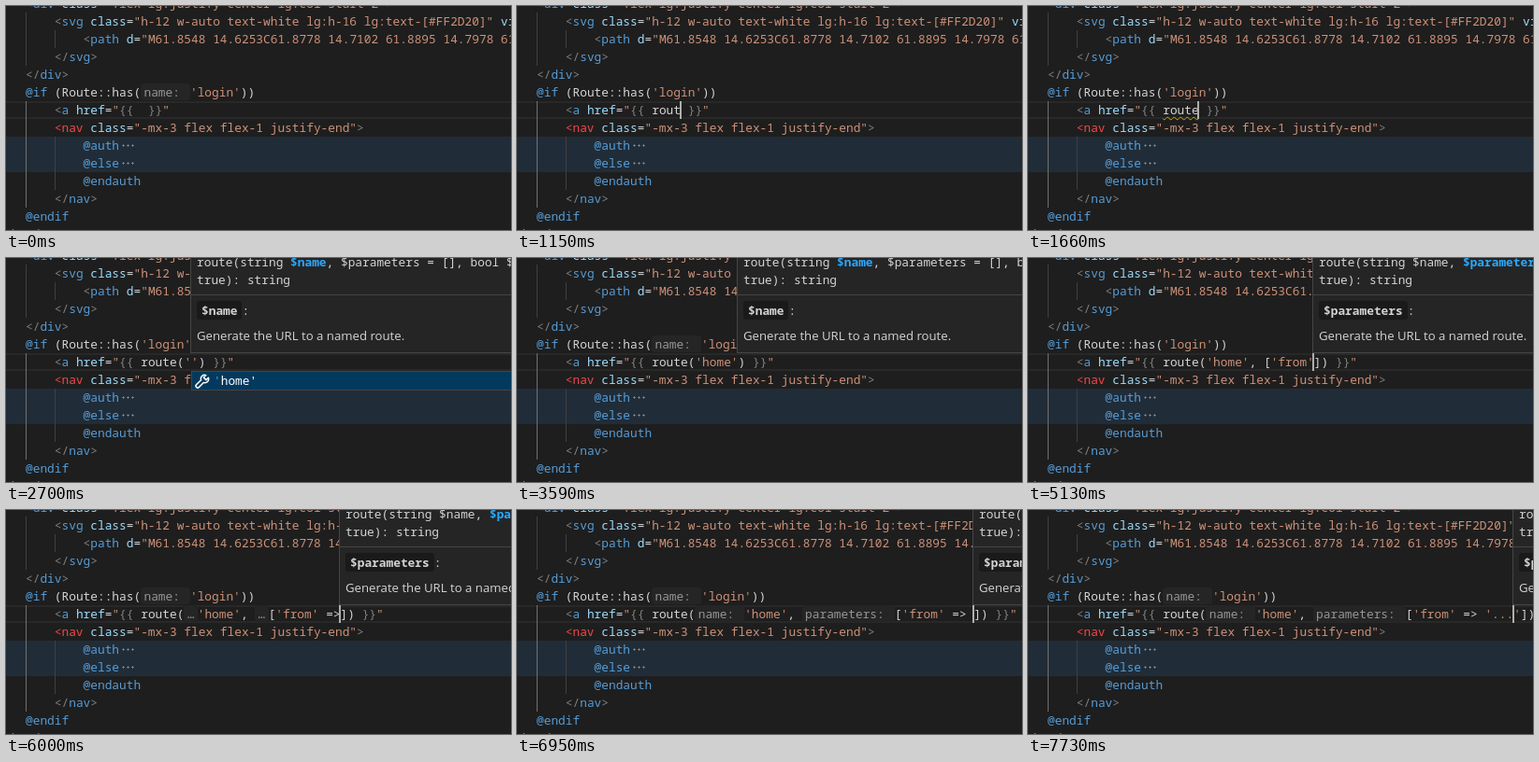
Recreate the animation shown at these times as an HTML page. Size 540 by 240 pixels, loop 8000 ms.

```html
<!DOCTYPE html>
<html lang="en">
<head>
<meta charset="utf-8">
<title>Editor typing</title>
<style>
html, body { margin: 0; width: 100%; height: 100%; overflow: hidden; background: #1e1e1e; }
#stage {
  position: relative; width: 540px; height: 240px; overflow: hidden;
  background: #1e1e1e; color: #d4d4d4;
  font: 12.83px/19px "Noto Sans Mono", "DejaVu Sans Mono", monospace;
  font-variant-ligatures: none;
}
#stage div, #cursor { position: absolute; }
#code { left: 0; top: 0; }
#code, #list, #tip > div { white-space: pre; }
.row { left: 0; width: 540px; height: 19px; }
.row > span { position: absolute; top: 0; }
.fold { background: #202d39; }
.current { box-sizing: border-box; border: solid #282828; border-width: 2px 0; }
.guide { width: 1px; background: #404040; }
.guide.active { background: #707070; }
.g { color: #808080; }
.b { color: #569cd6; }
.a { color: #9cdcfe; }
.s { color: #ce9178; }
.r { color: #f44747; }
.hint { color: #969696; background: #252525; padding: 0 3.3px; border-radius: 3px; }
.dots {
  display: inline-block; width: 15px; height: 5px; margin-left: 2px; vertical-align: 2px;
  background: radial-gradient(circle at 2.5px 2.5px, #909090 .8px, transparent 1.3px) 0 0 / 5px 5px;
}
.wavy { text-decoration: underline wavy #cca700 1px; text-underline-offset: 2px; }
.match { box-shadow: inset 0 0 0 1px #888; }
#cursor { top: 102px; width: 2px; height: 19px; background: #aeafad; }
#tip {
  top: -8px; width: 560px; height: 110px; box-sizing: border-box;
  background: #252526; border: 1px solid #454545; color: #d4d4d4;
}
#tip > div { left: 6px; }
#tip .sig { top: 2px; }
#tip .line { left: 0; top: 46px; width: 100%; height: 1px; background: #454545; }
#tip .param { top: 54px; }
#tip .param b { background: #1a1a1b; padding: 1px 5px; border-radius: 3px; }
#tip .doc { top: 81px; font: 13.2px/19px "Open Sans", "Noto Sans", sans-serif; }
#tip .hot, .hit { color: #2aaaff; }
#list {
  top: 121px; width: 430px; box-sizing: border-box;
  background: #252526; border: 1px solid #454545;
}
#list p { margin: 0; height: 19px; padding-left: 23px; position: relative; }
#list p:first-child { background: #04395e; color: #fff; }
#list svg { position: absolute; left: 3px; top: 2px; }
</style>
</head>
<body>
<div id="stage">
  <div id="code"></div>
  <span id="cursor"></span>
  <div id="list"></div>
  <div id="tip">
    <div class="sig"></div>
    <div class="line"></div>
    <div class="param"></div>
    <div class="doc">Generate the URL to a named route.</div>
  </div>
</div>
<script>
const CH = 7.698, LEFT = 21, PAD = 6.6, LOOP = 8000;
const $ = q => document.querySelector(q);
const span = (cls, text) => `<span class="${cls}">${text.replace(/</g, '&lt;')}</span>`;
const str = text => span('s', `"${text}"`);
const close = tag => span('g', '</') + span('b', tag) + span('g', '>');
const open = tag => span('g', '<') + span('b', tag) + ' ';
const attr = name => span('a', name) + '=';
const dots = '<span class="dots"></span>';

const row = (n, indent, html, cls = '') =>
  `<div class="row ${cls}" style="top:${7 + 19 * n}px"></div>` +
  `<div class="row" style="top:${7 + 19 * n}px"><span style="left:${LEFT + indent * 4 * CH}px">${html}</span></div>`;
const guide = (level, from, rows, cls = '') =>
  `<div class="guide ${cls}" style="left:${Math.round(LEFT + level * 4 * CH)}px;top:${7 + 19 * from}px;height:${19 * rows}px"></div>`;

const before =
  row(-1, 0, open('div') + attr('class') + str('flex lg:justify-center lg:col-start-2') + span('g', '>')) +
  row(0, 1, open('svg') + attr('class') + str('h-12 w-auto text-white lg:h-16 lg:text-[#FF2D20]') + ' ' + attr('viewBox') + str('0 0 62 65')) +
  row(1, 2, open('path') + attr('d') + str('M61.8548 14.6253C61.8778 14.7102 61.8895 14.7978 61.8897')) +
  row(2, 1, close('svg')) +
  row(3, 0, close('div'));
const after =
  row(6, 1, span('r', '<nav') + ' ' + attr('class') + str('-mx-3 flex flex-1 justify-end') + span('g', '>')) +
  row(7, 2, span('b', '@auth') + dots, 'fold') +
  row(8, 2, span('b', '@else') + dots, 'fold') +
  row(9, 2, span('b', '@endauth')) +
  row(10, 1, close('nav')) +
  row(11, 0, span('b', '@endif')) +
  row(12, -1, close('header')) +
  guide(0, 0, 3) + guide(1, 1, 1) + guide(0, 5, 6, 'active') + guide(1, 7, 3);

const HINTS = [[], ['…', '…'], ['name: ', 'parameters: ']];
const routes = ['route', 'routeIs', 'Route', 'Router', 'RouteGroup', 'RouteAction'];

// Each step changes part of the state: body text, caret index, blink,
// login hint, argument hints, tooltip parameter, suggestion list.
const steps = [
  [0, { body: '', at: 0, blink: 0, login: 1, args: 0, tip: '', list: null, wavy: 0, match: 0 }],
  [510, { blink: 1 }],
  [770, { body: 'r', at: 1 }],
  [820, { body: 'ro', at: 2 }],
  [870, { body: 'rou', at: 3 }],
  [1150, { body: 'rout', at: 4, login: 0 }],
  [1200, { body: 'route', at: 5 }],
  [1250, { list: { items: routes, at: 0, hit: 5 } }],
  [1570, { list: null }],
  [1660, { wavy: 1 }],
  [1720, { body: 'route()', at: 6, wavy: 0 }],
  [1760, { tip: '$name', login: 1 }],
  [1990, { match: 1 }],
  [2220, { body: "route('')", at: 7, match: 0, login: 0 }],
  [2360, { list: { items: ["'home'"], at: 7, hit: 1 } }],
  [2700, { blink: 0 }],
  [3030, { body: "route('home')", at: 12, blink: 1, list: null }],
  [3160, { login: 1 }],
  [3590, { blink: 0 }],
  [3870, { body: "route('home',)", at: 13, blink: 1, login: 0 }],
  [3930, { body: "route('home', )", at: 14, tip: '$parameters' }],
  [4070, { login: 1, args: 1 }],
  [4290, { body: "route('home', [])", at: 15, login: 0, args: 0 }],
  [4520, { body: "route('home', [''])", at: 16 }],
  [4570, { list: { items: ["'from'"], at: 16, hit: 1 } }],
  [5040, { body: "route('home', ['from'])", at: 21, list: null }],
  [5580, { blink: 0 }],
  [5770, { body: "route('home', ['from' ])", at: 22, blink: 1 }],
  [5820, { login: 1, args: 1 }],
  [6000, { body: "route('home', ['from' =>])", at: 24 }],
  [6150, { body: "route('home', ['from' => ])", at: 25 }],
  [6620, { blink: 0 }],
  [6950, { blink: 1, args: 2 }],
  [7410, { blink: 0 }],
  [7730, { body: "route('home', ['from' => '...'])", at: 29, blink: 1 }]
];

function hintsOf(s) {
  return HINTS[s.args]
    .map((text, i) => ({ text, pos: i ? s.body.indexOf('[') : 6 }))
    .filter(h => h.pos > 0);
}

function caretX(s, at) {
  const extra = hintsOf(s).filter(h => h.pos < at)
    .reduce((w, h) => w + h.text.length * CH + PAD, 0);
  return LEFT + (16 + at) * CH + extra;
}

function paint(text) {
  return text.replace(/=>/g, '=&gt;').replace(/'[^']*'/g, q => span('s', q));
}

function bodyHtml(s) {
  if (s.wavy) return span('wavy', s.body);
  if (s.match) return 'route' + span('match', '(') + span('match', ')');
  let html = '', from = 0;
  for (const h of hintsOf(s)) {
    html += paint(s.body.slice(from, h.pos)) + span('hint', h.text);
    from = h.pos;
  }
  return html + paint(s.body.slice(from));
}

const wrench = '<svg width="16" height="16" viewBox="0 0 16 16" fill="none" stroke="#fff" stroke-width="1.5" stroke-linejoin="round">' +
  '<path d="M11.8 1.6A4 4 0 0 0 6.6 6.7L1.6 11.6a1.9 1.9 0 0 0 2.8 2.8L9.3 9.4A4 4 0 0 0 14.4 4.2L11.9 6.6 9.4 4.1z"/></svg>';
const cube = '<svg width="16" height="16" viewBox="0 0 16 16" fill="none" stroke="#b180d7">' +
  '<path d="M8 2l5 3v6l-5 3-5-3V5zM3 5l5 3 5-3M8 8v6"/></svg>';

function render(s) {
  $('#code').innerHTML = before +
    row(4, 0, span('b', '@if') + ' (Route::has(' + (s.login ? span('hint', 'name: ') : '') + span('s', "'login'") + '))') +
    row(5, 1, open('a') + attr('href') + span('s', '"') + span('g', '{{') + ' ' + bodyHtml(s) + ' ' +
      span('g', '}}') + span('s', '"'), 'current') +
    after;

  const x = caretX(s, s.at);
  const edge = Math.floor(x - .9) + 'px';
  $('#cursor').style.left = edge;
  $('#cursor').style.display = s.blink ? 'block' : 'none';

  const tip = $('#tip');
  tip.style.display = s.tip ? 'block' : 'none';
  tip.style.left = edge;
  $('#tip .sig').innerHTML = 'route(string $name, $parameters = [], bool $absolute =\ntrue): string'
    .replace(s.tip === '$name' ? '$name' : '$parameters = []', m => `<b class="hot">${m}</b>`);
  $('#tip .param').innerHTML = `<b>${s.tip}</b>:`;

  const list = $('#list');
  list.style.display = s.list ? 'block' : 'none';
  if (s.list) {
    const { items, at, hit } = s.list;
    list.style.left = Math.floor(caretX(s, at)) + 'px';
    list.innerHTML = items.map(t => '<p>' + (hit === 1 ? wrench : cube) +
      span('hit', t.slice(0, hit)) + t.slice(hit) + '</p>').join('');
  }
}

let shown = -1;
function frame() {
  const t = performance.now() % LOOP;
  const n = steps.filter(([at]) => at <= t).length;
  if (n !== shown) {
    shown = n;
    render(Object.assign({}, ...steps.slice(0, n).map(([, change]) => change)));
  }
  requestAnimationFrame(frame);
}
frame();
</script>
</body>
</html>
```
